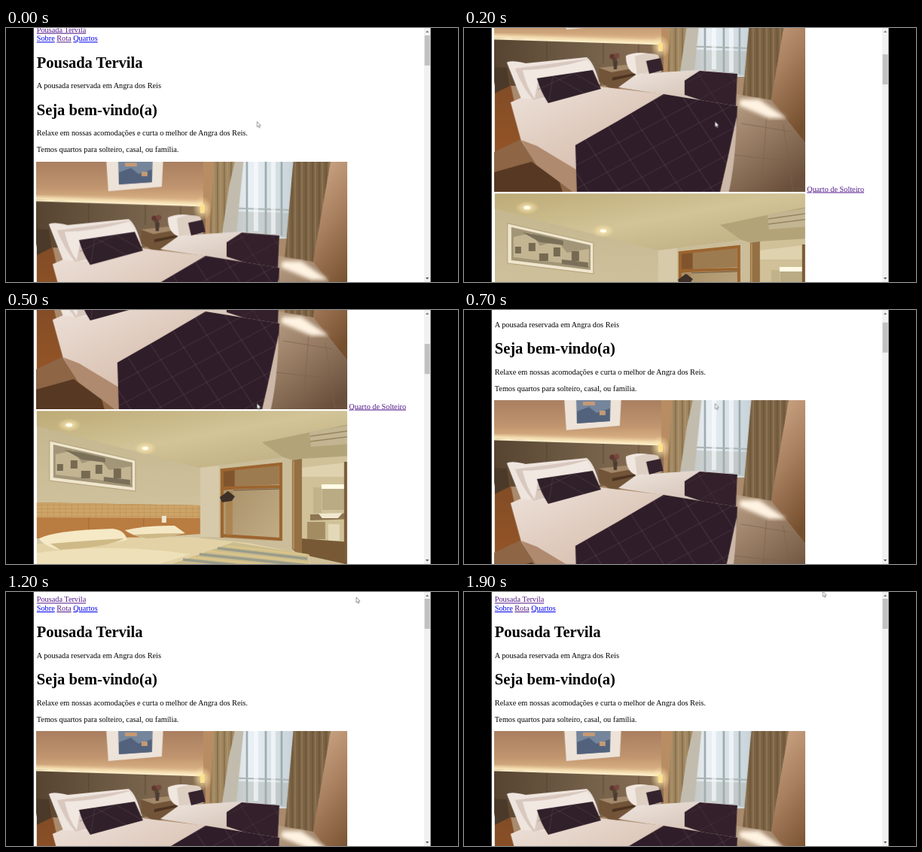
An HTML page for the animation above (2.1 s loop, 600 by 338 pixels).

```html
<!DOCTYPE html>
<html lang="pt-BR">
<head>
<meta charset="utf-8">
<title>Pousada Tervila</title>
<style>
  @property --scroll { syntax: "<number>"; inherits: true; initial-value: 0; }
  html, body { margin: 0; width: 100%; height: 100%; overflow: hidden; background: #000; }
  .stage { display: block; width: 100%; height: 100%; animation: scroll 2.1s step-end infinite; }
  .page { transform: translateY(calc(var(--scroll) * -1px)); }
  .thumb { transform: translateY(calc(var(--scroll) * .117px)); }
  .cursor { animation: point 2.1s step-end infinite; }
  text { font: 10.25px "Liberation Serif", "Times New Roman", serif; fill: #000; }
  .title { font-size: 20.5px; font-weight: bold; }
  .link { fill: #00e; text-decoration: underline; }
  .seen { fill: #551a8b; }

  /* One stop per 100 ms tick (4.762%). */
  @keyframes scroll {
    0% { --scroll: 7.7; }
    4.762% { --scroll: 102; }
    9.524% { --scroll: 223; }
    14.286% { --scroll: 300; }
    19.048% { --scroll: 320; }
    23.81% { --scroll: 309; }
    28.571% { --scroll: 205; }
    33.333% { --scroll: 65; }
    38.095%, 100% { --scroll: 0; }
  }
  @keyframes point {
    0% { transform: translate(333.3px, 124.5px); }
    42.857% { transform: translate(358px, 103px); }
    47.619% { transform: translate(408px, 57px); }
    52.381% { transform: translate(448px, 21px); }
    57.143% { transform: translate(465px, 7px); }
    61.905% { transform: translate(472px, 1.5px); }
    66.667%, 100% { transform: translate(476.3px, -1px); }
  }
</style>
</head>
<body>
<svg class="stage" viewBox="0 0 600 338" preserveAspectRatio="none">
  <defs>
    <linearGradient id="wall" x2="0" y2="1">
      <stop stop-color="#a67c5f"/><stop offset=".55" stop-color="#c0956f"/><stop offset="1" stop-color="#f0cb98"/>
    </linearGradient>
    <linearGradient id="board">
      <stop stop-color="#54422f"/><stop offset=".6" stop-color="#75614a"/><stop offset="1" stop-color="#8a7054"/>
    </linearGradient>
    <linearGradient id="sheet" x2="1" y2="1">
      <stop stop-color="#eee2da"/><stop offset=".5" stop-color="#dac3b4"/><stop offset="1" stop-color="#b8967f"/>
    </linearGradient>
    <linearGradient id="farSheet" x2="1" y2="1">
      <stop stop-color="#efe7e1"/><stop offset="1" stop-color="#cdb7a7"/>
    </linearGradient>
    <linearGradient id="window">
      <stop stop-color="#c9cac5"/><stop offset=".4" stop-color="#e9f1f6"/><stop offset="1" stop-color="#c6d2d8"/>
    </linearGradient>
    <linearGradient id="floor" x2=".7" y2="1">
      <stop stop-color="#c0a78c"/><stop offset=".5" stop-color="#987d64"/><stop offset="1" stop-color="#6a503c"/>
    </linearGradient>
    <linearGradient id="sideWall" x2=".3" y2="1">
      <stop stop-color="#d2ad8c"/><stop offset=".5" stop-color="#a98060"/><stop offset="1" stop-color="#75502f"/>
    </linearGradient>
    <linearGradient id="wood" x2="0" y2="1">
      <stop stop-color="#7d4a26"/><stop offset="1" stop-color="#945527"/>
    </linearGradient>
    <linearGradient id="ceiling" x2="1" y2="1">
      <stop stop-color="#bba873"/><stop offset=".5" stop-color="#d2c497"/><stop offset="1" stop-color="#b9a87c"/>
    </linearGradient>
    <linearGradient id="plaster" x2="0" y2="1">
      <stop stop-color="#c3b58d"/><stop offset="1" stop-color="#dbcfae"/>
    </linearGradient>
    <linearGradient id="closet" x2="1" y2="1">
      <stop stop-color="#a48a61"/><stop offset="1" stop-color="#c2ae88"/>
    </linearGradient>
    <radialGradient id="glow">
      <stop stop-color="#fffbe2"/><stop offset=".25" stop-color="#ffedb8" stop-opacity=".7"/><stop offset="1" stop-color="#ffe3a0" stop-opacity="0"/>
    </radialGradient>
    <pattern id="quilt" width="48" height="40" patternUnits="userSpaceOnUse" patternTransform="translate(160 306) skewX(-14) rotate(8)">
      <path d="M0 0L48 40M48 0L0 40" stroke="#8d7480" stroke-width=".5" opacity=".65"/>
    </pattern>
    <pattern id="folds" width="9" height="10" patternUnits="userSpaceOnUse">
      <path d="M2 0V10" stroke="#4d3c28" stroke-width="2" opacity=".3"/>
      <path d="M6 0V10" stroke="#c9b494" stroke-width="2" opacity=".2"/>
    </pattern>
    <pattern id="slats" width="8" height="5" patternUnits="userSpaceOnUse">
      <path d="M0 4.500H8M7.500 0V5" stroke="#a87a44" stroke-width=".5" opacity=".6"/>
    </pattern>
    <filter id="soft"><feGaussianBlur stdDeviation=".6"/></filter>
    <filter id="blur"><feGaussianBlur stdDeviation="2.5"/></filter>
  </defs>

  <rect x="36.5" width="527" height="338" fill="#fff"/>

  <g class="page">
    <text class="link seen" x="40.8" y="13.4">Pousada Tervila</text>
    <text x="40.8" y="25"><tspan class="link">Sobre</tspan> <tspan class="link seen">Rota</tspan> <tspan class="link">Quartos</tspan></text>
    <text class="title" x="40.8" y="60.4">Pousada Tervila</text>
    <text x="40.8" y="88.1">A pousada reservada em Angra dos Reis</text>
    <text class="title" x="40.8" y="123.4">Seja bem-vindo(a)</text>
    <text x="40.8" y="151">Relaxe em nossas acomodações e curta o melhor de Angra dos Reis.</text>
    <text x="40.8" y="172.9">Temos quartos para solteiro, casal, ou família.</text>
    <text class="link seen" x="455.3" y="440.5">Quarto de Solteiro</text>

    <!-- Twin room -->
    <svg x="40.8" y="185.8" width="412" height="254.7" viewBox="41 186 412 254.5">
      <rect x="41" y="186" width="412" height="255" fill="#a98a6c"/>
      <g filter="url(#soft)">
        <path d="M30 180H282V252L30 238Z" fill="url(#wall)"/>
        <path d="M30 232L262 240V246L30 239Z" fill="#fff0c4" filter="url(#blur)"/>
        <path d="M262 180H282V285H262Z" fill="#b98d63"/>
        <path d="M133 180H209L207 219L136 225Z" fill="#ede3d8"/>
        <path d="M149 180H195L194 213L150 216Z" fill="#75859b"/>
        <path d="M150 200L166 194L176 202L194 196V213L150 216Z" fill="#53627c"/>
        <path d="M158 187H174V192H158ZM180 199H188V205H180Z" fill="#c49a75"/>

        <path d="M30 236L265 245V290L180 300L41 300Z" fill="url(#board)"/>
        <path d="M110 240V270M185 243V270M232 244V262" stroke="#4c3b29" stroke-width=".6"/>
        <path d="M30 237L264 244.500" stroke="#fff1cd" stroke-width="1.800"/>
        <ellipse cx="261" cy="248" rx="13" ry="16" fill="url(#glow)"/>
        <path d="M258 243H264V254H258Z" fill="#ffe08c"/>

        <path d="M284 180H384L374 288H284Z" fill="url(#window)"/>
        <path d="M320 180V280M345 180V282M366 180V284" stroke="#9aa6a9" stroke-width="2.500"/>
        <path d="M284 247L378 250" stroke="#aab4b3" stroke-width="2"/>
        <path d="M284 251L378 254L375 286H284Z" fill="#aab0aa" opacity=".45"/>
        <path d="M332 180V278M355 180V282" stroke="#fff" stroke-width="6" opacity=".6"/>
        <path d="M300 180H316L306 279H284Z" fill="#c2bcae"/>
        <path d="M277 180H305L296 220L287 281H270Z" fill="#a1875f"/>
        <path d="M277 180H305L296 220L287 281H270Z" fill="url(#folds)"/>
        <path d="M382 180H432L408 319L370 316Z" fill="#7c6344"/>
        <path d="M382 180H432L408 319L370 316Z" fill="url(#folds)"/>
        <path d="M432 180H460V385L408 319Z" fill="url(#sideWall)"/>

        <path d="M362 311L408 319L460 385V445H335Z" fill="url(#floor)"/>
        <path d="M368 350L434 361M358 392L460 403M402 342L394 441M424 352L437 441" stroke="#79624d" stroke-width=".7"/>
        <path d="M367 318L392 318L428 343L405 343L365 326Z" fill="#fff3e2" filter="url(#blur)"/>

        <path d="M179 276L214 272L229 276V300L196 305L180 294Z" fill="#725438"/>
        <path d="M179 276L214 272L229 276L196 282Z" fill="#a3886a"/>
        <path d="M197 289L228 283V286L197 293Z" fill="#4b3321"/>
        <path d="M198 267H204L203 278H199Z" fill="#4c3b32"/>
        <circle cx="197" cy="261" r="3.500" fill="#5f3530"/><circle cx="203" cy="260" r="3.500" fill="#77473e"/><circle cx="200" cy="265" r="3" fill="#574233"/>

        <path d="M205 302L230 284L312 279L363 284L361 326L325 323L262 311Z" fill="url(#farSheet)"/>
        <path d="M215 260Q228 254 245 257L259 263L262 281L229 285Q215 280 215 260Z" fill="#f0e7e0"/>
        <path d="M227 261Q245 254 258 259L265 278L230 285Z" fill="#decfc3"/>
        <path d="M242 267L261 263L265 279L246 284Z" fill="#34222d"/>
        <path d="M293 293L313 280L363 284L361 327L330 324L293 312Z" fill="#33202b"/>
        <path d="M293 293L313 280L363 284L361 327L330 324L293 312Z" fill="url(#quilt)" opacity=".6"/>

        <path d="M41 275L57 276L78 372L41 390Z" fill="url(#wood)"/>
        <path d="M41 275L57 276L61 300L41 310Z" fill="#4b3a29"/>
        <path d="M36 390L78 370L152 441H36Z" fill="#8e6545"/>
        <path d="M36 416L90 401L127 428L132 445H36Z" fill="#573822"/>
        <path d="M62 322L90 310L180 301L265 311L363 327L341 445H150L96 404L76 373Z" fill="url(#sheet)"/>
        <path d="M76 372L97 380L150 412V445L96 405Z" fill="#b08a6e"/>
        <path d="M57 269Q62 265 82 270L163 262Q173 269 180 297L105 318L76 317Z" fill="#efe5df"/>
        <path d="M68 277Q100 273 164 264L181 298L92 319Q78 302 68 277Z" fill="#d9c8be"/>
        <path d="M78 279Q120 278 164 265L172 279L99 290L94 317Q83 302 78 279Z" fill="#f1e8e2"/>
        <path d="M97 290L171 279L182 304L112 323Q102 308 97 290Z" fill="#30202a"/>
        <path d="M98 305L146 283L180 303M113 320L118 287L160 310" fill="none" stroke="#604854" stroke-width=".5"/>
        <path d="M265 311L363 327L362 350L340 441H150L148 379L204 347Z" fill="#2f1d29"/>
        <path d="M265 311L363 327L362 350L340 441H150L148 379L204 347Z" fill="url(#quilt)"/>
        <path d="M362 341L340 445H351Q361 400 362 341Z" fill="#ccb8a8"/>
      </g>
    </svg>

    <!-- Double room -->
    <svg x="40.8" y="443.5" width="412" height="275" viewBox="41 134.500 412 275">
      <rect x="41" y="134" width="412" height="276" fill="url(#plaster)"/>
      <g filter="url(#soft)">
        <path d="M30 130H460V153L340 176L368 196L258 210L30 152Z" fill="url(#ceiling)"/>
        <path d="M340 176L460 151V202L381 200L368 196Z" fill="#b3a379"/>
        <path d="M258 210L368 196L381 200V338H258Z" fill="#cbbd99"/>
        <path d="M258 210L283 207V302H258Z" fill="#d6caaa"/>
        <ellipse cx="84" cy="153" rx="16" ry="9" fill="url(#glow)"/><ellipse cx="185" cy="184" rx="15" ry="9" fill="url(#glow)"/>
        <ellipse cx="84" cy="153" rx="4.500" ry="2.500" fill="#fffdf0"/><ellipse cx="185" cy="184" rx="4" ry="2.300" fill="#fffdf0"/>

        <path d="M58 174L172 200V241L58 227Z" fill="#efe6cd" stroke="#a8936b" stroke-width=".8"/>
        <path d="M63 179L168 203V236L63 223Z" fill="#a39678"/>
        <path d="M66 192L90 187L101 204L124 197L137 213L166 208V231L66 219Z" fill="#c3b592"/>
        <path d="M68 205H76V214H68ZM86 200H95V211H86ZM100 214H112V224H100ZM119 206H128V218H119ZM143 211H153V224H143Z" fill="#766a52"/>
        <path d="M78 186L101 190L132 197V203L101 199ZM130 222L165 226V233L130 228Z" fill="#7a705a"/>

        <path d="M36 256L258 260V298L185 303L36 304Z" fill="#b97c41"/>
        <path d="M36 256L258 260V277L36 276Z" fill="#cda468"/>
        <path d="M36 256L258 260V277L36 276Z" fill="url(#slats)"/>
        <path d="M110 276V292M183 277V292" stroke="#9c6532" stroke-width=".7"/>
        <path d="M207 274H213V283H207Z" fill="#efe6ce"/>

        <path d="M285 212L367 203V308L285 303Z" fill="url(#closet)"/>
        <path d="M285 212L304 213V238L287 240Z" fill="#80552d"/>
        <path d="M304 213L363 207V232L304 235Z" fill="#9d7b50"/>
        <path d="M287 303V213L365 205V307M287 237L365 235M287 300L365 305" fill="none" stroke="#9c642f" stroke-width="4"/>
        <path d="M292 241H301V300H292Z" fill="#a8773f" opacity=".6"/>
        <path d="M302 240L363 238" stroke="#6c5743" stroke-width="1"/>
        <path d="M284 249L295 241L304 248L300 254L287 256Z" fill="#3d3028"/>

        <path d="M392 198L460 194V415H392Z" fill="#d0c199"/>
        <path d="M392 210L460 202V222H392Z" fill="#dfd2ae"/>
        <path d="M420 236H460V266H420Z" fill="#b9ab84"/>
        <path d="M408 236H419V270H408Z" fill="#c1b28a"/>
        <path d="M419 232H460V238H419Z" fill="#fffbe6"/>
        <path d="M404 272L460 270V278L404 280Z" fill="#8d7552"/>
        <path d="M415 271L447 270L441 277H420Z" fill="#f1e8cf"/>
        <path d="M400 282H424V305H400Z" fill="#a48c62"/><path d="M428 285H443V307H428Z" fill="#e3d8b8"/>
        <path d="M392 304L460 309V340L392 325Z" fill="#775a35"/>
        <path d="M380 200L393 198V330L380 318Z" fill="#947044"/>
        <path d="M382 201V318" stroke="#bd9762" stroke-width="1.500"/>
        <path d="M449 202H460V338H449Z" fill="#7b5b37"/>
        <path d="M403 162L460 153V178L405 182Z" fill="#c3b591"/>
        <path d="M404 168L460 160M404 175L460 168" stroke="#95865f" stroke-width="1.500"/>

        <path d="M36 312L125 303L242 302L322 310L403 326V415H36Z" fill="#e2d2a6"/>
        <path d="M36 324Q120 311 215 321L245 325L204 338H36Z" fill="#eee0b8"/>
        <path d="M44 304Q66 293 142 291Q158 293 161 306Q118 316 70 319Q49 313 44 304Z" fill="#f5e9c6"/>
        <path d="M59 311Q106 307 157 304Q135 316 72 319Z" fill="#cfb986"/>
        <path d="M158 293Q188 286 224 287L238 297Q210 303 186 304Q167 300 158 293Z" fill="#f4e8c4"/>
        <path d="M168 299Q202 297 235 297Q211 304 186 304Z" fill="#cdb887"/>
        <path d="M215 340L302 309L402 325L403 415H190Z" fill="#cbbc8d"/>
        <path d="M235 332L385 348M257 325L402 340M281 317L400 331" stroke="#9a9c8a" stroke-width="3.500"/>
        <path d="M246 329L395 344M269 321L401 336M292 314L400 326" stroke="#dcc68a" stroke-width="2"/>
        <path d="M190 345L403 357V415H190Z" fill="#a89a72"/>
      </g>
    </svg>
  </g>

  <rect width="36.500" height="338"/>
  <rect x="563.500" width="36.500" height="338"/>
  <rect x="555" width="8.500" height="338" fill="#f1f1f1"/>
  <rect class="thumb" x="555.700" y="9" width="7" height="40" fill="#c1c1c1"/>
  <path d="M557 6L559.200 3.500L561.400 6Z" fill="#777"/>
  <path d="M557 332L559.200 334.500L561.400 332Z" fill="#505050"/>

  <path class="cursor" d="M0 0V7.200L1.600 5.800L2.700 8.200L3.800 7.700L2.800 5.300L4.900 5.200Z" fill="#fff" stroke="#555" stroke-width=".6"/>
</svg>
</body>
</html>
```
